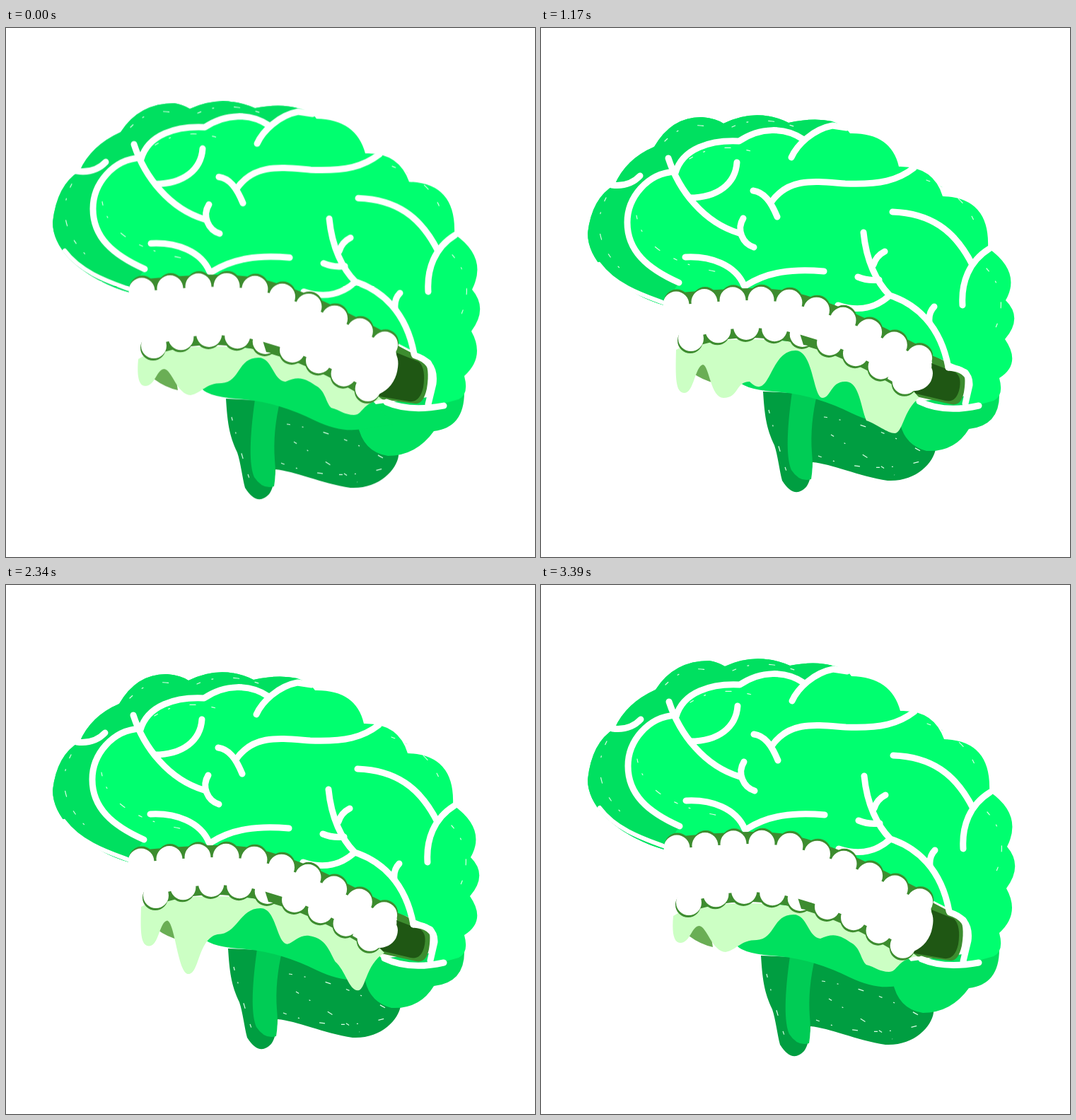
An HTML page without scripts that plays this animation: 748x748 px, repeating every 3420 ms.

```html
<!DOCTYPE html>
<html lang="en">
<head>
<meta charset="utf-8">
<title>Chomping brain</title>
<style>
html, body { margin: 0; height: 100%; overflow: hidden; background: #fff; }
svg { display: block; width: 100vw; height: 100vh; }
path { fill: none; }
/* --a rest, --b bite, --c ready (falls back to rest) */
.m, .veins path, .teeth path { d: var(--a); animation: morph 3420ms infinite linear; }
.veins path { stroke: #fff; stroke-width: 9; stroke-linecap: round; stroke-linejoin: round; }
.teeth path, .dots { stroke-linecap: round; }
.lift { animation: lift 3420ms infinite linear; }
.open { transform-origin: 0 534px; animation: open 3420ms infinite linear; }
.jaw { animation: jaw 3420ms infinite linear; }
.slime { fill: #ccffc4; animation: slime 3420ms infinite ease-in-out; }
.dark { stroke: #3d8c2f; }
.white { stroke: #fff; }
.veins .fleck, .fleck { stroke: #d9ffe6; stroke-width: 1.2; stroke-dasharray: 5 17 2 29 8 23; }
@keyframes morph {
  0%, 3.2% { d: var(--c, var(--a)); animation-timing-function: ease-in; }
  6.1%, 6.8% { d: var(--b); animation-timing-function: cubic-bezier(.33,1,.68,1); }
  32.9%, 70.2% { d: var(--a); animation-timing-function: cubic-bezier(.65,0,.35,1); }
  94.7%, 100% { d: var(--c, var(--a)); }
}
@keyframes lift {
  0%, 3.2% { transform: translate(1px,-19px); animation-timing-function: ease-in; }
  6.1% { transform: translate(0,0); }
  32.9%, 70.2% { transform: translate(0,0); animation-timing-function: cubic-bezier(.65,0,.35,1); }
  94.7%, 100% { transform: translate(1px,-19px); }
}
@keyframes open {
  0% { transform: scaleY(1); animation-timing-function: ease-out; }
  3.2% { transform: scaleY(1.105); animation-timing-function: ease-in; }
  6.1%, 100% { transform: scaleY(1); }
}
@keyframes jaw {
  0% { transform: matrix(1,0,0,1,-3,10); animation-timing-function: ease-out; }
  3.2% { transform: matrix(1,0,0,1,-3,21); animation-timing-function: ease-in; }
  6.1%, 6.8% { transform: matrix(1.02,0,0,1,-47,-15); animation-timing-function: cubic-bezier(.33,1,.68,1); }
  20.2% { transform: matrix(1,0,0,1,-3,-5); animation-timing-function: ease-out; }
  32.9%, 70.2% { transform: matrix(1,0,0,1,0,0); animation-timing-function: cubic-bezier(.65,0,.35,1); }
  94.7%, 100% { transform: matrix(1,0,0,1,-3,10); }
}
@keyframes slime {
  0%, 7%, 94.7%, 100% { d: path("M190 458C188 480 190 496 200 496C214 496 216 472 227 472C238 474 245 508 264 509C280 506 285 492 308 492C335 490 330 456 360 456C380 456 380 488 398 490C415 482 425 484 440 495C455 502 455 520 463 527C475 530 482 537 495 537C508 537 505 520 535 515L515 500C440 450 350 430 212 445Z"); }
  20.2% { d: path("M190 458C188 490 190 504 200 504C214 504 216 478 227 476C238 478 236 516 255 516C280 516 275 500 298 502C335 512 332 456 360 456C385 456 380 507 396 507C415 507 415 496 432 498C450 502 455 530 465 542C480 546 490 555 503 555C514 555 512 540 535 523L515 500C440 450 350 430 212 445Z"); }
  34.2% { d: path("M191 455C190 495 190 516 203 516C216 516 218 478 229 476C238 478 240 523 258 523C280 523 275 500 295 500C325 530 322 456 360 456C385 456 385 523 398 523C410 523 410 498 432 500C450 502 452 535 460 555C475 560 490 573 500 573C512 573 512 540 535 523L515 500C440 450 350 430 212 445Z"); }
  57.9% { d: path("M191 455C190 500 190 523 205 523C216 523 218 478 229 476C238 478 242 541 258 541C275 541 275 500 300 495C325 495 330 456 360 456C385 456 385 534 398 534C406 534 402 498 425 500C450 500 460 515 468 535C485 555 488 602 500 602C510 602 510 550 535 523L515 500C440 450 350 430 212 445Z"); }
  78.9% { d: path("M191 455C190 480 190 498 200 498C216 498 216 474 227 473C240 476 244 559 258 559C272 559 268 500 298 493C330 493 330 458 360 458C380 458 380 480 398 482C415 474 430 484 445 495C455 505 455 520 463 530C475 535 482 545 495 545C508 545 505 525 535 517L515 500C440 450 350 430 212 445Z"); }
}
</style>
</head>
<body>
<svg viewBox="0 0 748 748">
<defs>
  <path id="lowRow" d="M212 439C260 420 300 420 350 428C420 444 470 470 515 500" pathLength="8.01"/>
</defs>

<g class="jaw">
  <path style="fill:#009e41" d="M314 514C316 545 318 565 330 590C335 605 337 625 341 640Q358 667 375 649Q382 640 384 614C410 616 450 634 490 640C530 642 555 615 558 595L560 540L450 520Z"/>
  <path style="fill:#00cc55" d="M355 515Q343 600 354 625Q366 643 382 638Q385 620 383 600Q380 560 391 515Z"/>
  <path class="fleck" d="M322 540Q340 610 352 640M400 550Q470 560 540 600M392 605Q470 635 545 610M410 575Q450 600 500 632"/>
</g>

<path class="m" style="fill:#00e05e;
  --a:path('M515 530L648 515Q650 562 605 567Q585 600 545 598Q515 590 508 560Z');
  --b:path('M470 530L650 515Q648 562 600 570Q575 592 530 593Q475 585 460 530Z');
  --c:path('M500 535L648 515Q648 565 605 570Q580 605 540 605Q505 600 497 560Z')"/>

<!-- corner of the mouth -->
<path class="m" style="fill:#3d8c2f;
  --a:path('M526 516C555 500 556 470 550 460L595 484Q602 490 598 515Q594 535 580 532L526 520Z');
  --b:path('M497 500C540 500 546 480 542 459L586 483Q594 492 588 512Q580 530 568 528L497 504Z');
  --c:path('M523 520C552 510 558 470 548 446L590 468Q600 480 595 510Q590 533 578 531L523 524Z')"/>
<path class="m" style="fill:#1f5714;
  --a:path('M526 514C552 500 554 480 552 474L586 487Q596 494 591 513Q586 530 572 527L526 516Z');
  --b:path('M503 500C538 498 544 485 543 474L577 487Q588 494 583 511Q576 526 562 522L503 502Z');
  --c:path('M523 518C550 508 556 480 552 459L584 472Q594 482 590 508Q585 530 570 528L523 520Z')"/>

<g class="jaw">
  <path style="fill:#00e05e" d="M280 500Q290 512 340 515Q390 520 440 545Q480 564 510 556L550 550L520 515Q440 450 350 440L300 450Z"/>
  <path style="fill:#6aae55" d="M205 470L240 465L246 502Q228 498 212 486Z"/>
  <path class="slime"/>
  <path class="dark" stroke-width="18" d="M202 446C260 426 300 426 350 434C420 450 470 476 520 508"/>
  <g class="dots" stroke-dasharray="0 1" stroke-width="36">
    <use href="#lowRow" class="dark" transform="translate(-1 3)"/>
    <use href="#lowRow" class="white"/>
  </g>
  <path style="fill:#3d8c2f" d="M366 432L393 436L383 450L371 448Z"/>
  <path class="white" stroke-width="34" d="M204 424C260 404 300 404 350 412C420 428 470 454 530 490"/>
</g>

<g class="open">
  <path class="m" style="fill:#00ff6f;
    --a:path('M174 392C130 380 66 340 66 290Q72 240 104 222Q120 185 160 168Q185 125 228 126Q248 128 258 135Q305 112 350 134Q385 126 412 132Q430 138 437 149Q495 148 506 196Q555 195 568 238Q635 240 632 311Q680 345 657 385Q682 410 656 440Q680 475 648 495Q655 520 640 527L600 538Q612 488 602 483L550 462C480 425 420 395 350 384C300 378 250 386 190 388Z');
    --b:path('M120 398C80 385 19 340 20 290Q26 240 57 218Q70 183 106 166Q125 120 170 117Q190 115 205 119Q245 85 296 108Q330 103 368 110Q385 113 396 124Q480 130 495 183Q545 185 558 227Q620 232 620 298Q668 335 641 377Q670 405 645 436Q686 470 645 502Q655 520 640 529L588 535Q606 488 594 481L545 460C470 418 400 388 330 376C270 370 200 384 140 392Z');
    --c:path('M174 374C130 362 66 325 66 275Q72 222 104 203Q120 167 162 148Q188 107 238 107Q250 109 260 115Q305 94 352 114Q387 107 412 114Q432 118 439 129Q495 130 508 178Q555 176 570 218Q637 220 634 292Q682 325 659 370Q682 397 658 429Q678 465 648 492Q655 518 640 525L597 537Q610 480 600 470L550 444C480 406 420 376 350 365C300 359 250 367 190 369Z')"/>
  <path class="m" style="fill:#00e060;
    --a:path('M174 392C130 380 66 340 66 290Q72 240 104 222Q120 185 160 168Q185 125 228 126Q248 128 258 135Q305 112 350 134Q385 126 412 132L412 138Q385 143 370 157C345 140 310 140 280 160C240 158 200 170 190 205C150 205 122 240 122 275C122 315 150 340 195 360Z');
    --b:path('M120 398C80 385 19 340 20 290Q26 240 57 218Q70 183 106 166Q125 120 170 117Q190 115 205 119Q245 85 296 108Q330 103 368 110L372 112Q338 118 321 140C290 115 245 118 225 140C190 145 155 165 142 203C105 205 77 240 77 275C77 320 105 345 150 361Z');
    --c:path('M174 374C130 362 66 325 66 275Q72 222 104 203Q120 167 162 148Q188 107 238 107Q250 109 260 115Q305 94 352 114Q387 107 412 114L413 119Q386 124 371 138C346 121 311 121 281 141C241 139 201 151 191 186C151 186 123 221 123 256C123 296 151 321 196 341Z')"/>

  <g class="veins lift">
    <path class="fleck" style="--a:path('M92 240Q62 300 125 352M175 160Q210 125 250 145M270 140Q310 122 360 140M210 185Q250 160 300 175M135 265Q145 325 250 345M545 215Q600 235 615 280M630 340Q665 380 640 430');
      --b:path('M45 240Q18 305 80 355M120 148Q160 118 205 135M215 120Q260 100 310 118M160 175Q210 140 255 155M90 265Q100 330 210 350M530 205Q588 225 603 270M618 330Q650 365 625 420')"/>
    <path style="--a:path('M190 203C150 205 122 240 122 275C122 315 150 340 195 360');--b:path('M148 200C105 205 77 240 77 275C77 320 105 345 150 361')"/>
    <path style="--a:path('M180 184C195 230 230 275 280 290M286 269C276 285 285 305 301 310');--b:path('M127 181C150 225 190 270 250 285M254 260C247 275 260 300 278 303')"/>
    <path style="--a:path('M190 205C200 170 240 158 280 160C310 140 345 140 370 157');--b:path('M142 203C155 165 190 145 225 140C245 118 290 115 321 140')"/>
    <path style="--a:path('M354 183C362 165 385 143 412 138L432 141');--b:path('M308 160C316 142 345 118 372 112L394 116')"/>
    <path style="--a:path('M277 190C275 220 250 240 210 240M100 222Q125 225 140 209');--b:path('M226 174C232 205 205 235 168 235M55 220Q78 222 91 209')"/>
    <path style="--a:path('M300 230C315 232 325 245 334 267M325 247C350 210 390 217 430 220C480 222 505 215 527 198');--b:path('M259 214C280 215 297 230 305 254M297 228C315 200 350 198 390 202C450 208 490 203 518 186')"/>
    <path style="--a:path('M497 260C550 262 585 285 610 335M596 392C594 360 605 330 634 312');--b:path('M483 245C535 250 575 270 596 325M586 382C585 350 595 325 623 300')"/>
    <path style="--a:path('M456 289C460 330 475 360 493 378C530 390 565 420 576 480M493 378C475 395 450 402 420 392');--b:path('M440 272C450 315 470 350 487 364C525 380 560 410 565 475M484 370C465 388 440 395 411 380')"/>
    <path style="--a:path('M486 316Q474 322 470 335M448 352Q462 358 478 356M556 394Q548 402 549 415');--b:path('M473 302Q462 308 458 322M439 339Q455 347 472 347M549 383Q543 395 545 405')"/>
    <path style="--a:path('M204 324C240 322 275 335 287 364M290 364C320 345 355 340 400 344');--b:path('M166 324C205 318 250 335 265 360M267 360C300 340 350 328 388 332')"/>
    <path style="stroke-width:6;--a:path('M82 334C105 365 145 378 172 388');--b:path('M36 324C60 360 95 383 120 394')"/>
  </g>
  <g class="veins">
    <path style="--a:path('M576 480Q607 482 606 505L600 531M535 528Q570 545 619 534');--b:path('M567 473Q602 480 598 505L588 528M515 512Q560 540 615 535');--c:path('M578 463Q608 472 604 503L597 532M538 529Q570 543 619 534')"/>
  </g>

  <g class="teeth lift">
    <path class="dark" stroke-width="20" style="stroke-linecap:butt;--a:path('M184 385C250 380 300 374 350 382C420 398 480 432 542 464');--b:path('M132 389C200 379 270 369 330 374C400 384 460 414 531 456')"/>
    <g stroke-dasharray="0 1" stroke-width="37">
      <path class="dark" pathLength="9.01" transform="translate(1 -3)" style="--a:path('M191 391C250 386 300 380 350 388C420 404 480 438 535 467');--b:path('M140 395C200 385 270 375 330 380C400 390 460 420 525 459')"/>
      <path class="white" pathLength="9.01" style="--a:path('M191 391C250 386 300 380 350 388C420 404 480 438 535 467');--b:path('M140 395C200 385 270 375 330 380C400 390 460 420 525 459')"/>
    </g>
    <path class="white" stroke-width="30" style="--a:path('M189 407C250 402 300 396 350 404C420 420 480 454 534 482');--b:path('M138 411C200 401 270 391 330 396C400 406 460 436 522 473')"/>
  </g>
  <path class="m" style="fill:#fff;
    --a:path('M500 466C550 466 560 480 551 500Q542 515 520 513L490 496Z');
    --b:path('M490 458C540 458 549 470 542 485Q535 500 510 499L470 488Z');
    --c:path('M500 447C550 447 560 460 552 490Q545 512 522 520L490 495Z')"/>
</g>
</svg>
</body>
</html>
```
